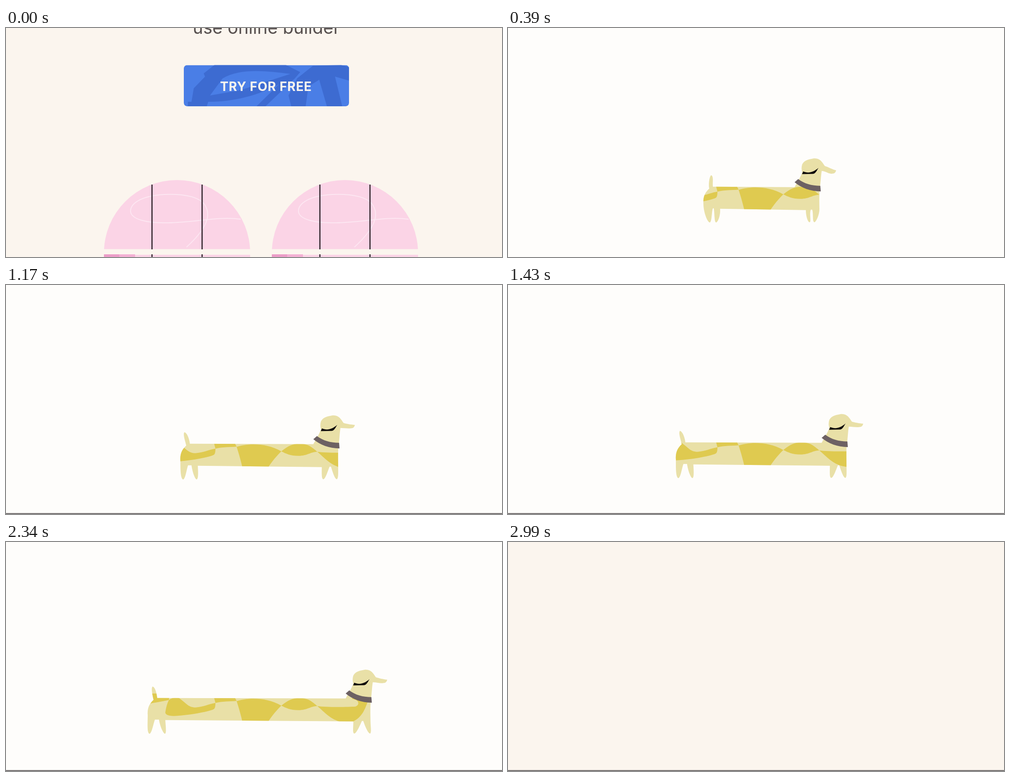
An HTML page with a canvas that plays this animation: 1099x509 px, repeating every 3.12 s.

```html
<!DOCTYPE html>
<html lang="en">
<head>
<meta charset="utf-8">
<title>Growing dog</title>
<style>
html, body { margin: 0; width: 100%; height: 100%; overflow: hidden; background: #fbf5ee; }
canvas { display: block; }
</style>
</head>
<body>
<canvas id="stage" width="1099" height="509"></canvas>
<script>
const ctx = document.getElementById('stage').getContext('2d');
const STEP = 130, LOOP = 3120;
const CREAM = '#fbf5ee', PAPER = '#fefdfb';

// step, tail-end x, nose x, leg spread, tail-tip offset, nose drop
const KEYS = [
  [1, 450, 710, 0, 17, 5],
  [3, 433, 727, 0, 17, 5],
  [6, 408, 752, .7, 9, -1],
  [11, 372, 787, .85, 9, 0],
  [15, 338, 820, 1, 9, 2],
  [20, 298, 861, 1, 12, 0],
  [22, 283, 875, 1, 12, 0]
];

// The coat stays put while the dog grows past it
const coat = new Path2D(`
  M311 340H362L361 354.5C340 359 322 361 303 366L313 371.5L298 387L288 360Z
  M353 382C355 370 357 362 361 354.5C366 350 378 347 384 350.5C400 362 404 371 420 371
  C437 370 450 363 464 361C464 366 464 373 460 375C448 381 400 389 372 390C358 390 353 386 353 382Z
  M461 349H507L511 356.5C495 358 480 357 464 361Z
  M511 357C530 350 575 346 610 367C600 377 590 388 580 404H524C521 390 516 372 511 357Z
  M610 367C625 355 635 350 650 350C670 350 678 358 690 368C675 368 668 377 648 377C630 377 620 372 610 367Z
  M690 368C712 371 760 370 774 369C782 366 782 360 778 356C774 353 768 352 766 352L772 345L802 357
  C795 375 790 392 768 403Q755 406 742 403C720 398 706 382 690 368Z`);

// Relative to the nose
const collar = new Path2D('M-92 340L-84 333C-71 343-54 348-35 348L-34 360.5C-57 360-77 353-92 340Z');
const eye = new Path2D('M-73 316C-63 320-53 320-39 308C-44 316-46 321-51 321.5L-75.5 322Z');

const swirl = new Path2D(`M400 487C435 455 455 425 444 400C435 375 395 368 350 370
  C300 373 275 390 276 408C278 425 310 434 360 433C420 432 470 418 520 425`);
const brush = new Path2D(`
  M403 174V164H411L416 134L441 108L438 101L462 82H620L652 98L640 112L575 174H555L605 125
  C560 150 500 165 448 164L445 174Z
  M680 84L742 82L760 87V117L729 108L745 174H711L694 115L670 130L664 174H632L626 150L645 112Z`);
const brushGap = new Path2D('M452 150L480 112C520 88 580 96 630 102L520 138Z');

function fill(color, path) {
  ctx.fillStyle = color;
  ctx.fill(path);
}

function rect(color, x, y, w, h) {
  ctx.fillStyle = color;
  ctx.fillRect(x, y, w, h);
}

function label(text, x, y, font, color, spacing) {
  ctx.font = font + ' Inter, sans-serif';
  ctx.letterSpacing = spacing;
  ctx.fillStyle = color;
  ctx.textAlign = 'center';
  ctx.fillText(text, x, y);
}

function dome(x) {
  ctx.save();
  ctx.translate(x, 0);
  ctx.beginPath();
  ctx.rect(217, 330, 324, 161.5);
  ctx.clip();
  ctx.beginPath();
  ctx.arc(379, 500, 162, 0, 7);
  ctx.fillStyle = '#fbd4e6';
  ctx.fill();
  ctx.strokeStyle = '#fde7f2';
  ctx.lineWidth = 2;
  ctx.stroke(swirl);
  ctx.restore();

  rect('#fbd4e6', x + 217, 504, 324, 5);
  rect('#f3b0d4', x + 251, 503, 35, 6);
  rect('#ec9dc8', x + 217, 503, 34, 6);
  for (const bar of [322, 433]) {
    rect('#4a3c44', x + bar, 348, 3, 144);
    rect('#4a3c44', x + bar, 503, 3, 6);
  }
}

function page() {
  label('use online builder', 577, 13, '400 39px', '#57504f', '0px');
  const button = new Path2D();
  button.roundRect(394, 82.5, 366, 91.5, 7);
  ctx.save();
  ctx.clip(button);
  fill('#4a7ee6', button);
  fill('#3d6bd1', brush);
  fill('#4a7ee6', brushGap);
  ctx.restore();
  label('TRY FOR FREE', 576, 140, '700 28px', '#faf5ef', '0.7px');
  dome(0);
  dome(372);
}

function poseAt(n) {
  const i = KEYS.findIndex(k => k[0] >= n);
  const b = KEYS[i], a = KEYS[Math.max(0, i - 1)];
  const u = a === b ? 0 : (n - a[0]) / (b[0] - a[0]);
  return a.map((v, j) => v + (b[j] - v) * u).slice(1);
}

function outline(L, R, s, tail, nose) {
  const p = new Path2D();
  const to = (...c) => c.length > 2 ? p.bezierCurveTo(...c) : p.lineTo(...c);
  const rear1 = L + 14 - 10 * s, rear2 = L + 28 + 10 * s;
  const front1 = R - 59 - 14 * s, front2 = R - 49 + 10 * s;
  const elbow = R - 67 - 8 * s, knee = L + 37 + 2 * s;
  const tip = L + tail;

  // back, neck and head
  p.moveTo(L + 21, 350);
  to(R - 92, 351);
  to(R - 87, 342, R - 77, 325, R - 75, 318);
  to(R - 77, 312, R - 77, 306, R - 75, 300);
  to(R - 70, 290, R - 58, 289, R - 49, 287);
  to(R - 36, 286, R - 31, 295, R - 25, 304);
  to(R - 18, 306, R - 8, 308 + nose * .8, R, 308.5 + nose);
  to(R - 1, 313 + nose, R - 3, 316 + nose, R - 9, 316 + nose);
  to(R - 16, 317 + nose, R - 24, 315, R - 32, 315);
  to(R - 34, 328, R - 34, 340, R - 36, 352);
  to(R - 38, 370, R - 37, 385, R - 37, 400);
  // front legs
  to(R - 37, 412, front2 + 5, 428, front2 + 1, 429);
  to(front2 - 4, 428, R - 50, 410, R - 53, 401);
  to(R - 56, 401);
  to(R - 60, 410, front1 + 5, 429, front1, 429);
  to(front1 - 4, 428, elbow, 415, elbow, 402);
  // belly and rear legs
  to(knee, 399);
  to(knee + 1, 415, rear2 + 4, 429, rear2, 429.5);
  to(rear2 - 4, 428, knee - 12, 412, knee - 14, 398);
  to(L + 21 - 5 * s, 398);
  to(L + 18 - 5 * s, 405, rear1 + 5, 429, rear1, 429.5);
  to(rear1 - 6, 428, L, 405, L, 388);
  // rump and tail
  to(L - 1, 370, L + 5, 362, L + 13, 354);
  to(L + 11, 345, tip - 4, 328, tip, 324.5);
  to(tip + 6, 326, L + 20, 340, L + 21, 350);
  p.closePath();
  return p;
}

function dog(n) {
  const pose = poseAt(n);
  const bob = -3.2 - 6 * Math.cos(2 * Math.PI * (n - 15) / 2.4);
  const scroll = n < 4 ? 12 : 0;
  const body = outline(...pose);
  ctx.save();
  ctx.translate(0, bob + scroll);
  fill('#e9e0a7', body);
  ctx.save();
  ctx.clip(body);
  fill('#dfca50', coat);
  ctx.restore();
  ctx.translate(pose[1], 0);
  fill('#6d6163', collar);
  fill('#0d0909', eye);
  ctx.restore();
}

function draw(now) {
  const n = Math.floor(now % LOOP / STEP);
  const walking = n > 0 && n < 23;
  rect(walking ? PAPER : CREAM, 0, 0, 1099, 509);
  if (n === 0) page();
  if (walking) dog(n);
  if (n > 3) rect('#5a5656', 0, 507, 1099, 1.7);
}

const start = performance.now();
function tick() {
  draw(performance.now() - start);
  requestAnimationFrame(tick);
}
tick();
</script>
</body>
</html>
```
